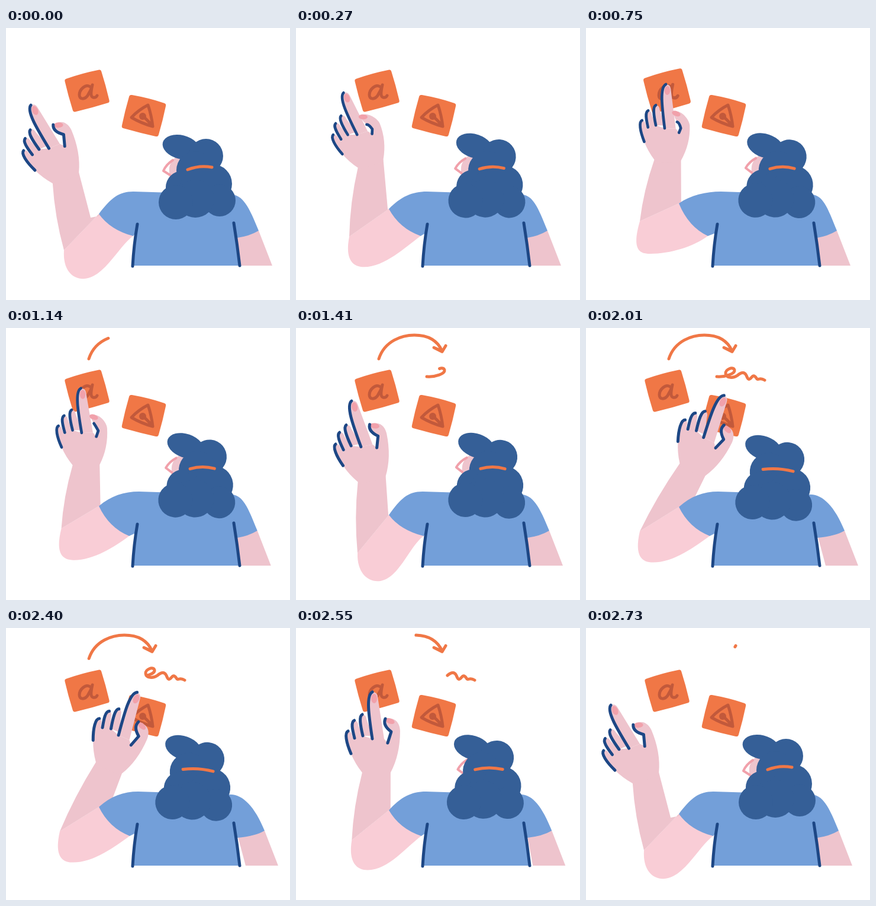
Animation of 480x459 px, one loop 2760 ms. Source, as an HTML page:

```html
<!DOCTYPE html>
<html lang="en">
<head>
<meta charset="utf-8">
<title>Tapping cards</title>
<style>
  html, body { margin: 0; width: 100%; height: 100%; overflow: hidden; background: #fff; }
  svg { display: block; width: 100vw; height: 100vh; }
  .line { fill: none; stroke-width: 5; stroke-linecap: round; stroke-linejoin: round; }
  .navy { stroke: #1d4785; }
  .orange { stroke: #f07746; }
  .mark { stroke: #c2593b; }
  .rim { stroke: #f1a1ab; stroke-width: 4; }
  .skin { fill: #eec4cd; }
  .light { fill: #f9cdd6; }
  .nail { fill: #f1a1ab; }
  .shirt { fill: #739fd9; }
  .hair { fill: #355f97; }
</style>
</head>
<body>
<svg viewBox="0 0 480 459">
  <defs>
    <path id="tile" fill="#f07746" d="M-28 -29Q0 -31 28 -29Q32 -29 32 -25Q33 0 32 25Q32 29 28 29Q0 30 -28 29Q-32 29 -32 25Q-33 0 -32 -25Q-32 -29 -28 -29Z"/>
  </defs>
  <g id="cardOne">
    <use href="#tile" transform="rotate(-15.3)"/>
    <path class="line mark" d="M5 -7C-3 -12 -13 -2 -13 7C-13 15 -4 15 1 8C5 2 8 -6 9 -10C7 -2 5 10 10 11C14 12 16 10 17 8"/>
  </g>
  <g id="cardTwo">
    <use href="#tile" transform="rotate(14)"/>
    <path class="line mark" d="M7 -18Q-9 -10 -21 3Q-4 13 15 18Q13 0 7 -18ZM0 2L11 13"/>
    <circle cx="-2" cy="1" r="6" fill="#c2593b"/>
  </g>
  <path id="arrow" class="line orange" pathLength="1" d="M140 52C150 21 180 12 200 12C225 12 240 23 247 39L233 33L247 40L253 30"/>
  <path id="squiggle" class="line orange" pathLength="1" d="M221 82C236 83 252 77 251 71C249 64 235 70 236 77C237 85 249 85 256 80C263 74 268 74 271 80C274 88 276 88 280 83C284 78 287 83 289 86C292 88 294 83 302 88"/>

  <path id="upperArm" class="light"/>
  <path id="forearm" class="skin"/>
  <g id="hand">
    <path id="fingers" class="skin"/>
    <path id="palm" class="skin"/>
    <ellipse id="thumbNail" class="nail" rx="8" ry="4.5"/>
    <ellipse class="nail" cx="-4" cy="-125" rx="5" ry="8"/>
    <path id="fingerLines" class="line navy"/>
    <path id="thumbLine" class="line navy"/>
  </g>

  <path id="rightArm" class="skin"/>
  <path id="shirt" class="shirt"/>
  <path class="line navy" d="M222 331Q216 366 214 402M385 329Q391 366 395 401"/>

  <g id="head">
    <g id="face">
      <path class="skin" d="M288 217Q274 228 276 243L277 262L300 262V217Z"/>
      <path class="line rim" d="M282 223Q271 230 266 241L277 248"/>
    </g>
    <g class="hair">
      <ellipse cx="296" cy="201" rx="32" ry="20" transform="rotate(14 296 201)"/>
      <circle cx="338" cy="216" r="29"/>
      <circle id="nape" cx="320" cy="240" r="32"/>
      <circle cx="298" cy="269" r="28"/>
      <circle cx="325" cy="272" r="32"/>
      <circle cx="349" cy="263" r="33"/>
      <circle cx="361" cy="291" r="27"/>
      <circle cx="320" cy="288" r="32"/>
      <circle cx="287" cy="294" r="29"/>
    </g>
    <path id="band" class="line orange"/>
  </g>
</svg>
<script>
const LOOP = 2760;
const $ = id => document.getElementById(id);
const set = (id, attrs) => { for (const k in attrs) $(id).setAttribute(k, attrs[k]); };
const mix = (a, b, u) => a + (b - a) * u;
const clamp = v => Math.min(1, Math.max(0, v));

// x, y, tilt: wrist; curl: thumb; elbowX, elbowY: left end of the elbow crease; sleeve: right sleeve
const rest = { x: 101, y: 253, tilt: 22.7, curl: 0, elbowX: 98, elbowY: 375, sleeve: 427, lean: 0, turn: 0 };
const rising = { ...rest, x: 126, y: 229, tilt: 18, curl: 1, elbowX: 90, elbowY: 352, sleeve: 425, lean: .65 };
const tapOne = { ...rising, x: 138, y: 223, tilt: -1.6, elbowX: 91, elbowY: 326, sleeve: 424, lean: .8 };
const back = { ...rest, x: 128, y: 255, tilt: 11.6, elbowX: 104, elbowY: 380, sleeve: 428, lean: 1 };
const tapTwo = { ...back, x: 180, y: 239, tilt: -26, elbowX: 91, elbowY: 343, sleeve: 437, turn: 1 };

const motion = [
  [0, rest], [270, rising], [490, { ...tapOne, y: 205 }], [620, tapOne], [1060, tapOne],
  [1345, { ...back, x: 125, y: 264, elbowY: 389 }], [1410, back], [1640, tapTwo], [2300, tapTwo],
  [2400, { ...tapTwo, x: 174, y: 236, tilt: -23.5 }], [2715, rest], [LOOP, rest]];
const press = start => [[0, { size: 1 }], [start, { size: 1 }], [start + 70, { size: .95 }],
  [start + 175, { size: 1.06 }], [start + 310, { size: 1 }], [LOOP, { size: 1 }]];
const pressOne = press(575), pressTwo = press(1685);

// Smooth interpolation through the keys without overshoot
function sample(keys, t) {
  let i = 0;
  while (i < keys.length - 2 && t >= keys[i + 1][0]) i++;
  const span = keys[i + 1][0] - keys[i][0], u = (t - keys[i][0]) / span;
  const slope = (k, name) => keys[k] && keys[k + 1]
    ? (keys[k + 1][1][name] - keys[k][1][name]) / (keys[k + 1][0] - keys[k][0]) : 0;
  const tangent = (p, q) => p * q > 0 ? 2 * p * q / (p + q) * span : 0;
  const result = {};
  for (const name in keys[i][1]) {
    const s = slope(i, name), d = s * span;
    const m0 = tangent(slope(i - 1, name), s), m1 = tangent(s, slope(i + 1, name));
    result[name] = keys[i][1][name] + u * (m0 + u * (3 * d - 2 * m0 - m1 + u * (m0 + m1 - 2 * d)));
  }
  return result;
}

// Fingers stand upright around the wrist at (0, 0)
function drawFingers() {
  const finger = (x, tip, baseX, base, bow, width) => {
    const line = `M${x} ${tip}C${x - bow} ${tip + bow / 2} ${x - bow * .55} ${(tip + base) / 2} ${baseX} ${base}`;
    return { line, fill: `${line}H${baseX + width}L${x + width * .45} ${tip + 8}Q${x + width * .4} ${tip} ${x} ${tip}Z` };
  };
  const all = [finger(-48, -70, -43, -32, 6, 15), finger(-37.5, -88, -37, -58, 6, 15),
    finger(-24, -98, -23, -62, 6, 16), finger(-7, -136, -7, -57, 11, 20)];
  set('fingers', { d: all.map(f => f.fill).join('') });
  set('fingerLines', { d: all.map(f => f.line).join('') });
}

function drawHand({ x, y, tilt, curl }) {
  set('hand', { transform: `translate(${x} ${y}) rotate(${-tilt}) scale(${1 - .06 * curl})` });
  const bottom = mix(-91, -69, curl), nailX = mix(23, 13, curl), nailY = mix(-87, -84, curl);
  const bendX = mix(25, 22, curl), bendY = mix(-69, -58, curl);
  const outerX = mix(40, 38, curl), outerY = mix(-70, -63, curl);
  const curve = `${mix(10, 19, curl)} ${mix(-80, -68, curl)}`;
  set('thumbLine', { d: `M15 ${bottom}Q${curve} ${bendX} ${bendY}L19 -50` });
  set('thumbNail', { transform: `translate(${nailX} ${nailY}) rotate(20)` });
  set('palm', { d: `M-43 -32L-37 -58L-23 -62L-7 -57H13L19 -50L${bendX} ${bendY}Q${curve} 15 ${bottom}
    Q${nailX - 9} ${nailY - 3} ${nailX} ${nailY - 4}
    C${nailX + 13} ${nailY - 4} ${outerX} ${outerY - 8} ${outerX} ${outerY}
    Q40 -30 24 0L22 4H-22L-24 0Q-36 -15 -43 -32Z` });
}

function drawBody({ x, y, tilt, curl, elbowX, elbowY, sleeve }) {
  const angle = tilt * Math.PI / 180, half = 24 * (1 - .06 * curl);
  const wx = half * Math.cos(angle), wy = half * Math.sin(angle);
  // The shoulder and sleeve follow the height of the elbow
  const drop = elbowY - 326;
  const top = 296 + drop * .36, under = 206 + drop * .18, shoulder = 228 - drop * .26;
  const bottomX = elbowX + 17 + drop * .31, bottomY = elbowY + 55 - drop * .14;
  const inner = (x - 130) * .48;

  set('forearm', { d: `M${x - wx} ${y + wy}L${x + wx} ${y - wy}L${157 + inner} ${top - inner * .45}
    L160 ${top + 3}L157 ${top}L${elbowX} ${elbowY}Q${(x - wx + elbowX) / 2 - 6} ${(y + wy + elbowY) / 2} ${x - wx} ${y + wy}Z` });
  set('upperArm', { d: `M${elbowX} ${elbowY}C${elbowX - 14 + drop * .24} ${elbowY + 48 - drop * .3} ${bottomX - 18} ${bottomY} ${bottomX} ${bottomY}
    C${bottomX + 35} ${bottomY} ${under - 25} 369 ${under} 351V331L157 ${top}Z` });
  set('shirt', { d: `M157 ${top}C${177} ${top - (top - 276) * .7} ${shoulder - 25} 276 ${shoulder} 276
    L380 281C400 281 ${sleeve - 16} 302 ${sleeve} 342Q${sleeve - 15} 351 391 354L395 401H214L219 346L${under} 351
    Q${mix(157, under, .33)} ${mix(top, 351, .72)} 157 ${top}Z` });
  set('rightArm', { d: `M390 345L${sleeve} 342L${sleeve + 23} 401H${sleeve - 32}Z` });
}

function drawHead({ lean, turn }) {
  set('head', { transform: `translate(${-5 * turn} ${4 * turn}) rotate(${6 * lean} 325 285)` });
  set('face', { transform: `translate(${14 * turn} ${-3 * turn})` });
  set('nape', { cx: 320 - 11 * turn });
  set('band', { d: `M${307 - 8 * turn} ${239 - 2 * turn}Q${327 - 3 * turn} 231 ${348 + 2 * turn} 235` });
}

function drawStroke(id, start, end) {
  set(id, { 'stroke-dasharray': `${Math.max(end - start, 0)} 2`, 'stroke-dashoffset': -start,
    visibility: end > start ? 'visible' : 'hidden' });
}

function render(now) {
  const t = now % LOOP, pose = sample(motion, t);
  const progress = (from, to) => clamp((t - from) / (to - from));
  drawHand(pose);
  drawBody(pose);
  drawHead(pose);
  set('cardOne', { transform: `translate(137 106) scale(${sample(pressOne, t).size})` });
  set('cardTwo', { transform: `translate(233 148) scale(${sample(pressTwo, t).size})` });
  drawStroke('arrow', progress(2400, 2735), progress(1045, 1390));
  drawStroke('squiggle', progress(2360, 2690), progress(1290, 1665));
}

drawFingers();
const began = performance.now();
(function tick() {
  render(performance.now() - began);
  requestAnimationFrame(tick);
})();
</script>
</body>
</html>
```
